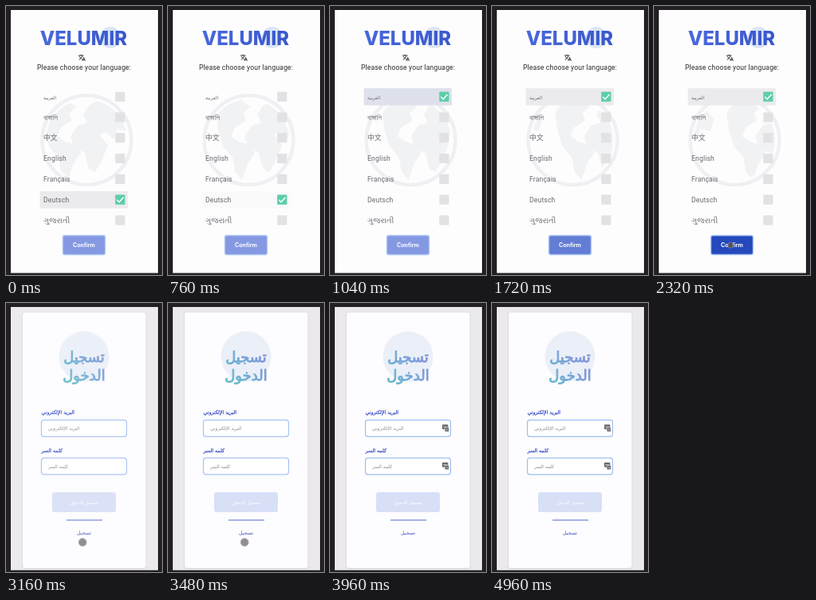
These frames come from a looping animation (196x337 px, 5 s). An HTML page:

```html
<!DOCTYPE html>
<html lang="en">
<head>
<meta charset="utf-8">
<style>
html, body { margin: 0; width: 100%; height: 100%; overflow: hidden; background: #231f24; }
svg { display: block; width: 100%; height: 100%; font-family: Roboto, "Noto Sans", "Noto Sans CJK SC", sans-serif; }
.ar { font-family: "DejaVu Sans", sans-serif; }
.label { font-size: 6.200px; fill: #3a50c6; stroke: #3a50c6; stroke-width: .25px; }
.hint { font-size: 5.900px; fill: #8b8b92; }
</style>
</head>
<body>
<svg viewBox="0 0 196 337">
  <defs>
    <linearGradient id="brand"><stop stop-color="#4868dc"/><stop offset="1" stop-color="#3a58cc"/></linearGradient>
    <linearGradient id="heading" gradientUnits="userSpaceOnUse" x1="68" y1="102" x2="126" y2="62">
      <stop stop-color="#66bccb"/><stop offset=".5" stop-color="#76a2d8"/><stop offset="1" stop-color="#8a90d8"/>
    </linearGradient>
    <clipPath id="sphere"><circle cx="101" cy="168" r="51"/></clipPath>
    <filter id="shadow" x="-10%" y="-10%" width="120%" height="120%">
      <feDropShadow dx="0" dy=".5" stdDeviation="1.3" flood-color="#504860" flood-opacity=".2"/>
    </filter>
  </defs>
  <rect x="6" y="5" width="185" height="329.5" fill="#fefdfe"/>

  <g id="languagePage">
    <circle cx="101.5" cy="168" r="56" fill="none" stroke="#eef0f3" stroke-width="4.5"/>
    <g clip-path="url(#sphere)" fill="#f0f2f4">
      <g id="land">
        <g id="continents">
          <path d="M45 134q10-17 30-17l13 9-9 9 4 8-14 9-5 11 10 7 12 3 8 11-9 13-7 21-9-10-3-18-12-14-6-19z"/>
          <path d="M104 125l15-9 24 8 14 18-5 15-12-3-5 13-9-9-8 3 10 14-8 19-8 14-8-4-5-20-13-6-5-15 9-13 12-4-5-10z"/>
        </g>
        <use href="#continents" x="-128"/>
      </g>
    </g>
    <circle cx="131" cy="39.5" r="13.5" fill="#dbe5f5"/>
    <text x="97.5" y="49" text-anchor="middle" font-family="Inter, sans-serif" font-weight="800" font-size="24" fill="url(#brand)">VELUMIR</text>
    <path transform="translate(90.6 60) scale(.4)" fill="none" stroke="#222" stroke-width="2.3"
      d="M1 5H17M9 2V5M4 8Q6 13 12 16.5M14 5Q12 13 3 18.5M13 22L17.5 11L22 22M14.6 18.5H20.4"/>
    <text x="98" y="80" text-anchor="middle" font-size="8.6" letter-spacing=".15" fill="#2a2a2e">Please choose your language:</text>
    <g id="rows"></g>
    <rect id="confirm" x="71.5" y="287.5" width="53" height="24" rx="2.5" stroke="#a9c4f3" stroke-width="1.4"/>
    <text x="98" y="302.2" text-anchor="middle" font-family="Inter, sans-serif" font-weight="700" font-size="7" fill="#fff">Confirm</text>
  </g>

  <g id="loginPage">
    <rect x="6" y="5" width="185" height="329.5" fill="#ebe9eb"/>
    <rect x="21" y="12" width="154.5" height="320" rx="3" fill="#fdfcfe" filter="url(#shadow)"/>
    <circle cx="98" cy="67" r="31.5" fill="#ebeff8"/>
    <g class="ar" text-anchor="middle" font-size="18" fill="url(#heading)" stroke="url(#heading)" stroke-width=".9">
      <text x="98" y="74">تسجيل</text><text x="98" y="96.5">الدخول</text>
    </g>
    <g id="fields"></g>
    <rect x="58" y="237" width="80" height="25" rx="3" fill="#d8e0f7"/>
    <text class="ar" x="98" y="251.5" text-anchor="middle" font-size="5.8" fill="#fff">تسجيل الدخول</text>
    <path d="M76 272H121" stroke="#4a68d2"/>
    <text class="ar" x="98" y="289.5" text-anchor="middle" font-size="6.2" fill="#3a50c6">تسجيل</text>
  </g>

  <circle id="pointer" cx="96.2" cy="299.8" stroke="#bdb9bc"/>
</svg>
<script>
const $ = id => document.getElementById(id);
const set = (el, attrs) => { for (const key in attrs) el.setAttribute(key, attrs[key]); };
const ramp = (t, from, to) => Math.min(1, Math.max(0, (t - from) / (to - from)));
const ease = x => x * x * (3 - 2 * x);
const mix = (a, b, x) => `rgb(${a.map((v, i) => Math.round(v + (b[i] - v) * x))})`;

const languages = [['العربية', 5.9], ['বাঙ্গালি', 9.2], ['中文', 8.8], ['English', 8.6],
  ['Français', 8.6], ['Deutsch', 8.6], ['ગુજરાતી', 9.8]];
const [ARABIC, GERMAN] = [0, 5];

$('rows').innerHTML = languages.map(([name, size], i) => `
  <g transform="translate(0 ${113.7 + i * 25.8})">
    <rect class="band" x="42.5" y="-10.7" width="110.5" height="21.4" rx="1" opacity="0"/>
    <text x="47" y="3" ${i ? '' : 'class="ar"'} font-size="${size}" letter-spacing="${size === 8.6 ? .15 : 0}" fill="#68686e">${name}</text>
    <rect x="137.3" y="-6.2" width="12.2" height="12.2" rx=".8" fill="#e2e2e5"/>
    <g class="tick" opacity="0">
      <rect x="137.3" y="-6.2" width="12.2" height="12.2" rx=".8" fill="#5ccdab"/>
      <path d="M139.3 0l2.9 3 5.4-6" fill="none" stroke="#fff" stroke-width="1.5"/>
    </g>
  </g>`).join('');

$('fields').innerHTML = [['البريد الإلكتروني', 139], ['كلمه السر', 186.5]].map(([name, y]) => `
  <text class="ar label" x="44.5" y="${y}">${name}</text>
  <rect class="box" x="44.5" y="${y + 7.7}" width="107" height="20.6" rx="3" fill="#fff" stroke-width="1.2"/>
  <text class="ar hint" x="53" y="${y + 20}">${name}</text>
  <g class="autofill" transform="translate(141 ${y + 13.2})" fill="#6a6a70">
    <rect width="7.4" height="6" rx="1"/>
    <rect x="3.2" y="3.6" width="5.2" height="5.4" rx="1" stroke="#fff" stroke-width=".5"/>
    <path d="M1.3 3H6M5 6.500H7" stroke="#ddd" stroke-width=".8"/>
  </g>`).join('');

const bands = document.querySelectorAll('.band');
const ticks = document.querySelectorAll('.tick');
const boxes = document.querySelectorAll('.box');
const icons = document.querySelectorAll('.autofill');

function draw() {
  const t = performance.now() % 5000;

  const picked = ramp(t, 760, 900);
  set(bands[GERMAN], { opacity: 1 - ramp(t, 680, 780), fill: '#ebebed' });
  set(bands[ARABIC], { opacity: picked, fill: mix([222, 225, 236], [235, 235, 237], ramp(t, 1040, 1320)) });
  set(ticks[GERMAN], { opacity: 1 - picked });
  set(ticks[ARABIC], { opacity: picked });
  set($('land'), { transform: `translate(${t * .02} 0)` });
  set($('confirm'), { fill: mix([133, 152, 226], [37, 73, 188], ease(ramp(t, 1600, 1900))) });
  set($('languagePage'), { opacity: 1 - ramp(t, 2340, 2600) });

  set($('loginPage'), { opacity: ramp(t, 2720, 3200) });
  set($('heading'), { gradientTransform: `translate(${14 * (1 - ease(ramp(t, 3200, 4400)))} 0)` });
  const filled = ramp(t, 3640, 3760);
  boxes.forEach(box => set(box, { stroke: mix([169, 195, 243], [158, 192, 240], filled) }));
  icons.forEach(icon => set(icon, { opacity: filled }));

  const press = ramp(t, 2260, 2420);
  set($('pointer'), {
    r: 2.5 + 2.5 * press,
    fill: mix([45, 40, 60], [146, 141, 145], press),
    'stroke-width': press,
    opacity: Math.min(ramp(t, 2260, 2320), 1 - ramp(t, 3600, 3800)),
  });
  requestAnimationFrame(draw);
}
draw();
</script>
</body>
</html>
```
